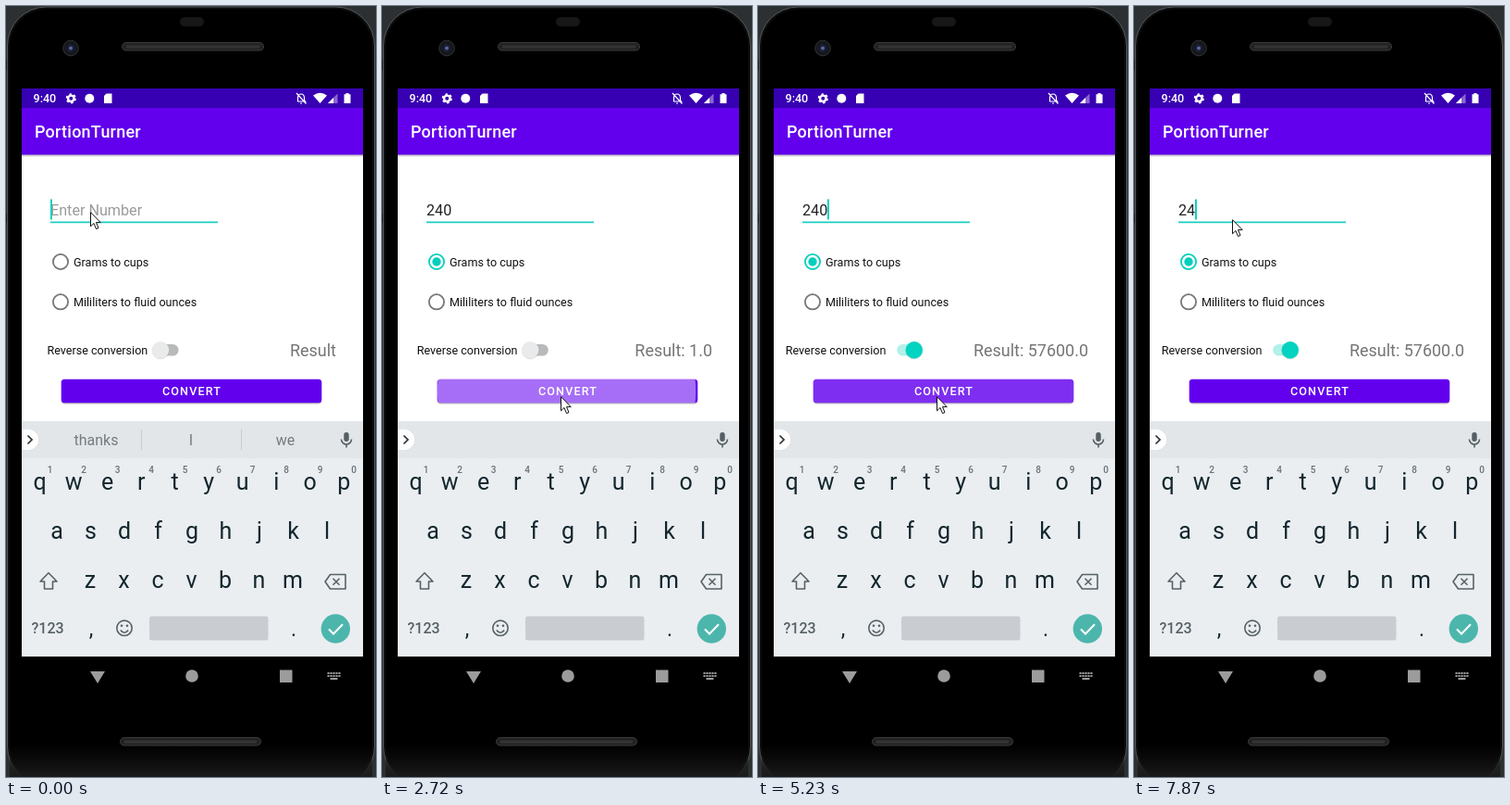
Recreate the animation shown at these times as an HTML page. Size 400 by 832 pixels, loop 8 s.

```html
<!DOCTYPE html>
<html lang="en">
<head>
<meta charset="utf-8">
<title>PortionTurner</title>
<style>
html, body { margin: 0; width: 100%; height: 100%; overflow: hidden; background: #000; }
svg { display: block; width: 400px; height: 832px; font-family: Roboto, sans-serif; }
.body { font-size: 12.57px; fill: #111; }
.med { font-weight: 500; }
</style>
</head>
<body>
<svg id="stage" viewBox="0 0 400 832" xmlns="http://www.w3.org/2000/svg">
  <defs>
    <linearGradient id="chin" x2="0" y2="1">
      <stop offset="0" stop-color="#141414" stop-opacity="0"/><stop offset="1" stop-color="#1b1b1b"/>
    </linearGradient>
    <linearGradient id="drop" x2="0" y2="1">
      <stop offset="0" stop-opacity=".3"/><stop offset="1" stop-opacity="0"/>
    </linearGradient>
    <clipPath id="screen"><rect x="17" y="89" width="369" height="613"/></clipPath>
    <clipPath id="btnClip"><rect x="59.700" y="402.700" width="281.600" height="25.600" rx="3.500"/></clipPath>
  </defs>

  <!-- phone -->
  <rect width="400" height="832" fill="#2d3032"/>
  <path d="M0 58h3v11H0zM0 224h3v10H0z" fill="#17191b"/>
  <rect x="1.500" y="1" width="397" height="840" rx="42" fill="#0d0d0e" stroke="#55585a"/>
  <rect x="4" y="3.500" width="392" height="836" rx="40" fill="#000"/>
  <rect x="4" y="796" width="392" height="36" fill="url(#chin)"/>
  <rect x="188" y="12" width="26" height="10" rx="5" fill="#171717"/>
  <g fill="#222" stroke="#3b3b3b">
    <rect x="125.500" y="39.500" width="153" height="8.500" rx="4.200"/>
    <rect x="123.500" y="789.500" width="152" height="8.500" rx="4.200"/>
  </g>
  <path d="M130 44H274M128 794H271" stroke="#343434" stroke-width="3"/>
  <circle cx="70" cy="45.500" r="8.300" fill="#15171b" stroke="#303236"/>
  <circle cx="70" cy="45.500" r="4.500" fill="#1a1d33"/>
  <circle cx="70" cy="45.500" r="2" fill="#59639c"/>

  <g clip-path="url(#screen)">
    <rect x="17" y="89" width="369" height="613" fill="#fff"/>
    <rect x="17" y="160" width="369" height="3.500" fill="url(#drop)"/>
    <rect x="17" y="89" width="369" height="21" fill="#3700b3"/>
    <rect x="17" y="110" width="369" height="50.500" fill="#6200ee"/>
    <text class="med" x="29.500" y="104.300" font-size="12.570" fill="#fff">9:40</text>
    <text class="med" x="31" y="142" font-size="17.960" letter-spacing=".25" fill="#fff">PortionTurner</text>

    <!-- status icons -->
    <g fill="#fff">
      <circle cx="70.300" cy="99.800" r="3.200" fill="none" stroke="#fff" stroke-width="2.400"/>
      <circle cx="70.300" cy="99.800" r="4.800" fill="none" stroke="#fff" stroke-width="1.600" stroke-dasharray="2.500 2.527"/>
      <circle cx="90.300" cy="99.800" r="5"/>
      <path d="M108.500 94.500H114.500V105H106V97Z"/>
      <path d="M332 96.500Q339.500 91 347 96.500L339.500 105Z"/>
      <path d="M358.500 94.500V105H348Z" opacity=".4"/>
      <path d="M354 99V105H348Z"/>
      <path d="M367.500 94H370.500V95.300H372.500V105H365.500V95.300H367.500Z"/>
    </g>
    <path d="M315.500 103V98.500Q316 95 319 95Q322 95 322.500 98.500V102L323.500 103ZM318 105H320M314 94L324.500 105.500" fill="none" stroke="#fff" stroke-width="1.200"/>

    <!-- form -->
    <path d="M48 233.300H229" stroke="#1ccfc0" stroke-width="1.800"/>
    <text id="entry" x="48" y="226" font-size="16.160"></text>
    <rect id="caret" y="208.500" width="1.900" height="22" fill="#03cfbd"/>
    <path id="handle" d="M75.500 233L82 239.500A9 9 0 1 1 69 239.500Z" fill="#03dac5"/>
    <circle id="radioRipple" cx="59" cy="276"/>
    <g fill="none" stroke-width="1.800">
      <circle id="ring" cx="59" cy="276" r="8.100"/>
      <circle cx="59" cy="319.300" r="8.100" stroke="#757575"/>
    </g>
    <circle id="dot" cx="59" cy="276" fill="#03cfbd"/>
    <text class="body" x="73" y="280.700">Grams to cups</text>
    <text class="body" x="73" y="324">Mililiters to fluid ounces</text>
    <g id="toggle">
      <text class="body" x="44.500" y="375.800">Reverse conversion</text>
      <rect id="track" x="165" y="365" width="21.500" height="12.600" rx="6.300"/>
      <circle id="toggleRipple" cy="371" fill="#e2e2e2"/>
      <g id="thumb">
        <circle cy="372" r="9.300" fill="#000" opacity=".13"/>
        <circle cy="371.300" r="9.200"/>
      </g>
    </g>
    <text id="result" x="357" y="378" font-size="17.960" text-anchor="end" fill="#757575"></text>
    <rect x="60" y="404.500" width="281" height="25" rx="3.500" opacity=".25"/>
    <rect x="59.700" y="402.700" width="281.600" height="25.600" rx="3.500" fill="#6200ee"/>
    <circle id="btnRipple" cy="415.500" fill="#fff" clip-path="url(#btnClip)"/>
    <text class="med" x="169" y="420" font-size="12.570" letter-spacing="1.120" fill="#fff">CONVERT</text>

    <!-- keyboard -->
    <rect x="17" y="448" width="369" height="254" fill="#eaeef1"/>
    <rect x="17" y="448" width="369" height="40" fill="#e2e6e9"/>
    <rect x="10" y="457" width="25" height="22" rx="11" fill="#fff"/>
    <path d="M23.500 463.500L28 468L23.500 472.500" fill="none" stroke="#263238" stroke-width="1.700"/>
    <g id="hints" font-size="16" text-anchor="middle" fill="#737b80">
      <text x="97.500" y="474">thanks</text><text x="200" y="474">I</text><text x="302" y="474">we</text>
      <path d="M146.500 457V479M254.500 457V479" stroke="#c6cbce"/>
    </g>
    <rect x="365.300" y="460" width="5.400" height="10" rx="2.700" fill="#555f64"/>
    <path d="M362.500 467.500A5.500 5.500 0 0 0 373.500 467.500M368 473V476.500" fill="none" stroke="#555f64" stroke-width="1.600"/>
    <g id="keys" text-anchor="middle" fill="#13262d"></g>
    <g fill="none" stroke="#566166" stroke-width="1.600">
      <path d="M46 611.800L55 621H50.500V629H41.500V621H37Z" stroke-linejoin="round"/>
      <path d="M350.500 613.500H367V629H350.500L345 621.300Z" stroke-linejoin="round"/>
      <path d="M353.500 617.800L360.500 624.800M360.500 617.800L353.500 624.800"/>
      <circle cx="128" cy="671.300" r="8.200"/>
      <path d="M123.800 673.500Q128 679 132.200 673.500"/>
    </g>
    <circle cx="125" cy="668.700" r="1.300" fill="#566166"/><circle cx="131" cy="668.700" r="1.300" fill="#566166"/>
    <text class="med" x="27.500" y="677" font-size="16" fill="#566166">?123</text>
    <rect x="155" y="658.500" width="128.500" height="26" rx="2.500" fill="#c9cdd1"/>
    <circle cx="356.300" cy="672" r="15.700" fill="#4db6ac"/>
    <path d="M349 672.500L354 677.500L364 667.300" fill="none" stroke="#fff" stroke-width="2"/>
  </g>

  <!-- navigation -->
  <g fill="#9c9c9c">
    <path d="M91 718H107L99 731Z"/>
    <circle cx="201" cy="723" r="6.800"/>
    <rect x="296" y="716.500" width="13.500" height="13.500"/>
    <path d="M347.500 719H361.500V721H347.500ZM347.500 722H361.500V724H347.500ZM350.500 725H358.500V727H350.500Z"/>
  </g>
  <path d="M350 719V724.500M353 719V724.500M356 719V724.500M359 719V724.500" stroke="#000" stroke-width=".8"/>

  <path id="mouse" d="M.5 .7V15.800L4 12.500L6.500 18.600L9 17.500L6.500 11.600H11.200Z" fill="#fff" stroke="#111" stroke-linejoin="round"/>
</svg>
<script>
const LOOP = 8000, BLINK = 500, GLIDE = 120, GROW = 140;
const $ = id => document.getElementById(id);
const set = (id, attrs) => { for (const k in attrs) $(id).setAttribute(k, attrs[k]); };
const clamp = v => Math.min(1, Math.max(0, v));
const ease = v => { v = clamp(v); return v * v * (3 - 2 * v); };

// What the user does, and when (ms)
const keys = [560, 710, 1110], erase = 7750;
const pickRadio = 2050, pickAgain = 6430, flip = 4250, fieldTap = 6950;
const press1 = 2593, press2 = 4870;
const show1 = 2710, show2 = 5100;

// Pointer stops: arrival time, x, y
const stops = [
  [0, 91, 222], [560, 97, 220], [1640, 111, 271], [2360, 193, 421], [3180, 151, 345],
  [3450, 151, 365], [3700, 163, 368], [4385, 193, 421], [5830, 105, 278], [6930, 106, 230]
];

function pointer(t) {
  let [, x, y] = stops[0];
  for (const [end, nx, ny] of stops.slice(1)) {
    const k = ease((t - end + GLIDE) / GLIDE);
    x += (nx - x) * k;
    y += (ny - y) * k;
  }
  return [x, y];
}

// Ink circle that grows from a press, then fades until its life ends
function ripple(dt, size, alpha, life) {
  const on = dt >= 0 && dt < life;
  return {
    r: on ? size * clamp(dt / GROW) ** .8 : 0,
    opacity: on ? alpha * clamp((life - dt) / (life - GROW)) : 0
  };
}

function addKeys() {
  const row = (s, x, y, size = 25, extra = '') => [...s].map((c, i) =>
    `<text x="${x + i * 36.5}" y="${y}" font-size="${size}" ${extra}>${c}</text>`).join('');
  $('keys').innerHTML = row('qwertyuiop', 36.7, 522) + row('asdfghjkl', 55, 575) +
    row('zxcvbnm', 91, 628) + row(',', 92, 680, 23) + row('.', 311, 680, 23) +
    row('1234567890', 47.5, 504, 10, 'class="med" fill="#687278"');
}

function drawField(t) {
  const typed = '240'.slice(0, t >= erase ? 2 : keys.filter(k => t >= k).length);
  // Typing or tapping restarts the blink
  const restart = t >= erase ? erase : t >= fieldTap ? fieldTap : t >= keys[2] ? 1010 : t;
  $('entry').textContent = typed || 'Enter Number';
  set('entry', { fill: typed ? '#222' : '#9a9a9a' });
  set('caret', {
    x: Math.round(48 + typed.length * 9.08),
    opacity: 1 - Math.floor((t - restart) / BLINK) % 2
  });
  set('handle', { opacity: t < 7200 ? 0 : clamp(1 - (t - erase) / GLIDE) });
  set('hints', { opacity: +(t < keys[0]) });
}

function drawOptions(t) {
  const size = 4.7 * ease((t - pickRadio) / 300);
  set('dot', { r: size });
  set('ring', { stroke: size ? '#03cfbd' : '#757575' });
  set('radioRipple', ripple(t - (t < pickAgain ? pickRadio : pickAgain), 18, .12, 250));

  const pos = ease((t - flip) / 290), cx = 167 + 16.6 * pos;
  set('track', { fill: pos ? '#b3f1ea' : '#b9b9b9' });
  set('thumb', { transform: `translate(${cx})`, fill: pos ? '#03d3c0' : '#e9eaeb' });
  set('toggleRipple', { cx, ...ripple(t - flip, 18, 1, 250) });
}

function drawResult(t) {
  const value = t >= show2 ? ': 57600.0' : t >= show1 ? ': 1.0' : '';
  $('result').textContent = 'Result' + value;
  // A wider result pushes the switch left by a fifth of the growth
  const shift = (50 - $('result').getComputedTextLength()) / 5;
  set('toggle', { transform: `translate(${shift})` });

  const dt = t - (t < press2 ? press1 : press2);
  set('btnRipple', { cx: 184 + 17 * clamp(dt / GROW), ...ripple(dt, 150, .43, 520) });
}

function draw(t) {
  drawField(t);
  drawOptions(t);
  drawResult(t);
  set('mouse', { transform: `translate(${pointer(t)})` });
}

addKeys();
const start = performance.now();
function tick(now) {
  draw(Math.max(0, now - start) % LOOP);
  requestAnimationFrame(tick);
}
draw(0);
requestAnimationFrame(tick);
</script>
</body>
</html>
```
